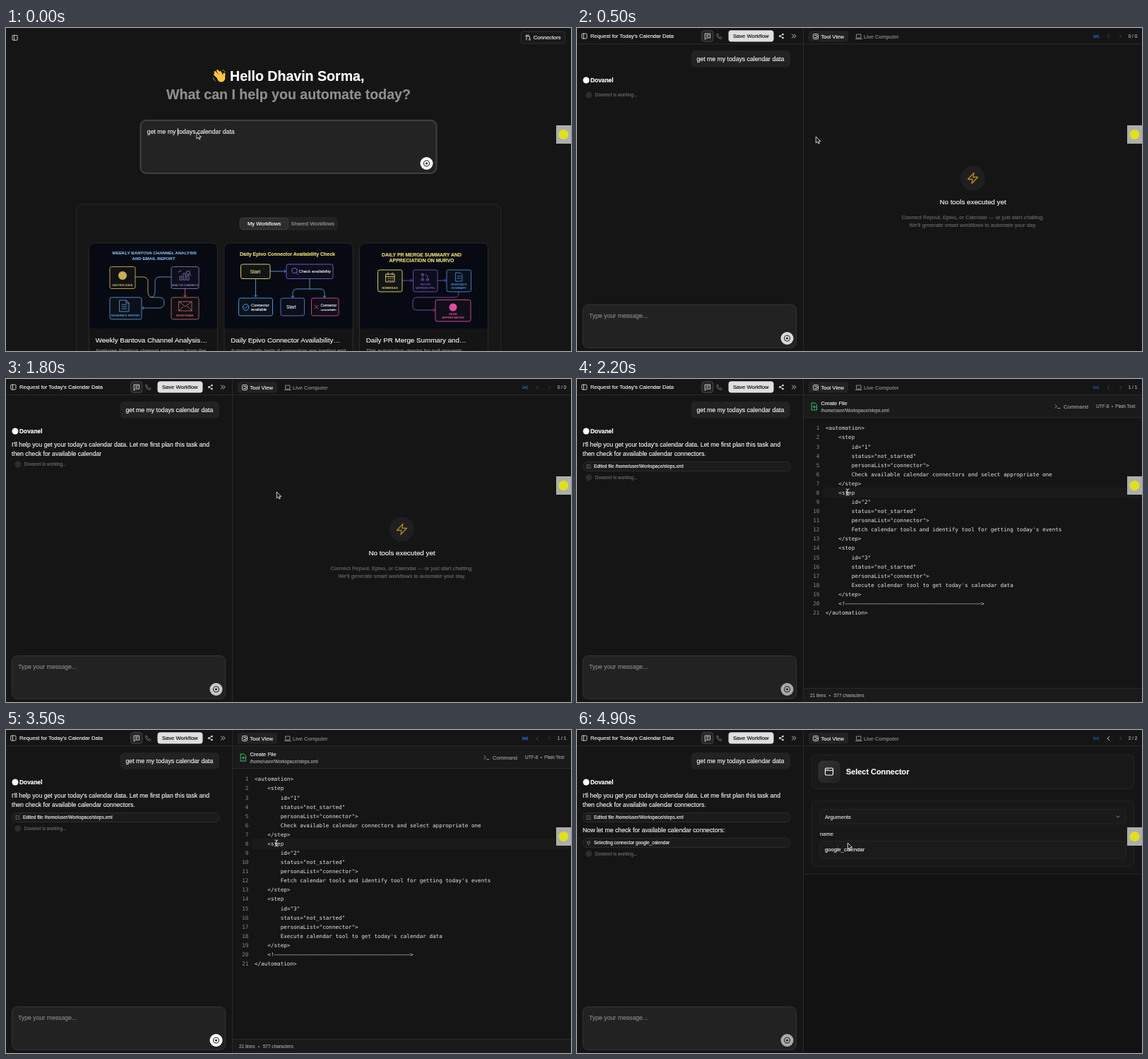
Write an HTML page that moves like this. It is 800 px wide and 458 px high and loops after 5 s.

```html
<!DOCTYPE html>
<html lang="en">
<head>
<meta charset="utf-8">
<title>Workflow assistant</title>
<style>
html, body { margin: 0; width: 100%; height: 100%; overflow: hidden; background: #151515; }
svg { display: block; width: 100vw; height: 100vh; font-family: "Liberation Sans", Arial, sans-serif; }
text { white-space: pre; stroke-width: .16px; }
.mono { font-family: "DejaVu Sans Mono", monospace; stroke: none; }
.icon { fill: none; stroke-linecap: round; stroke-linejoin: round; }
</style>
</head>
<body>
<svg id="stage" viewBox="0 0 800 458"></svg>
<script>
const LOOP = 5000, STEP = 100;
const OPEN_CHAT = 500, REPLY = 1200, FILE_READY = 2100, FOLLOW_UP = 3600, CONNECTOR = 4100;
// The interface is drawn at 800/1470 scale: 12, 14, 16, 18, 20 and 36 px type.
const XS = 6.53, SM = 7.62, MD = 8.71, LG = 9.8, XL = 10.88, HERO = 19.58;

const REPLY_LINES = [
  "I'll help you get your today's calendar data. Let me first plan this task and",
  "then check for available calendar connectors."
];
const FOLLOW_LINE = "Now let me check for available calendar connectors:";

const escapeText = s => s.replace(/&/g, "&amp;").replace(/</g, "&lt;");
const text = (x, y, size, s, fill = "#f2f2f2", extra = "") =>
  `<text x="${x}" y="${y}" font-size="${size}" fill="${fill}" stroke="${fill}" ${extra}>${escapeText(s)}</text>`;
const centered = (x, y, size, s, fill, extra = "") => text(x, y, size, s, fill, `text-anchor="middle" ${extra}`);
const box = (x1, y1, x2, y2, r, fill, stroke = "none", width = 1) =>
  `<rect x="${x1}" y="${y1}" width="${x2 - x1}" height="${y2 - y1}" rx="${r}" fill="${fill}" stroke="${stroke}" stroke-width="${width}"/>`;
const disc = (x, y, r, fill, extra = "") => `<circle cx="${x}" cy="${y}" r="${r}" fill="${fill}" ${extra}/>`;
const ring = (x, y, r, stroke, width = .9) => disc(x, y, r, "none", `stroke="${stroke}" stroke-width="${width}"`);
const icon = (d, stroke = "#ddd", width = .9) => `<path class="icon" d="${d}" stroke="${stroke}" stroke-width="${width}"/>`;
const group = (id, body) => `<g id="${id}">${body}</g>`;
const BOLD = 'font-weight="bold"';

const sidebarIcon = (x, y) => box(x, y, x + 7.2, y + 7, 1.2, "none", "#ddd", .9) + icon(`M${x + 2.6} ${y}v7`);
const sendButton = (x, y) => disc(x, y, 9, "#fff") + ring(x, y, 4, "#222", 1.1) + disc(x, y, 1.6, "#222");

// Workflow cards
const artBox = (x1, y1, x2, y2, color, labels = [], size = 4.2) => box(x1, y1, x2, y2, 2.5, color + "0c", color, .9) +
  labels.map((s, i) => centered((x1 + x2) / 2, y2 - 3.6 - (labels.length - 1 - i) * 5, size, s, color)).join("");
const artTitle = (x, y, size, s, color) => centered(x, y, size, s, color, BOLD);

function emailReportArt() {
  const gold = "#c9ad55", violet = "#7d74b8", blue = "#6094c8", red = "#bd6a5d";
  return artTitle(210, 320.7, 6.1, "WEEKLY BANTOVA CHANNEL ANALYSIS", "#79b4e6") +
    artTitle(209, 328.6, 6.1, "AND EMAIL REPORT", "#79b4e6") +
    icon("M183 353H194Q201 353 201 360V374Q201 382 208 382H210", gold) +
    icon("M234 353H218Q211 353 211 360V374Q211 382 204 382M211 382H217Q224 382 224 389Q224 397 217 397H193m2-2l-2 2l2 2", blue) +
    icon("M253.5 369V381m-2-2l2 2l2-2", red) +
    artBox(147, 338.5, 183, 369.5, gold, ["GATHER DATA"]) + disc(165, 351, 6, gold) +
    artBox(234, 338.5, 273, 369.5, violet, ["ANALYZE CHANNELS"], 3.7) +
    icon("M246 357v-5h3v5zM251 357v-9h3v9zM256 357v-6h3v6zM244 346l4-2M260 349l2 2", violet) + ring(258, 347, 2.6, violet) +
    artBox(147, 382, 192, 413, blue, ["GENERATE REPORT"]) +
    icon("M161 386h9l4 4v12h-13zM170 386v4h4M164 392h7M164 395h7M164 398h7", blue) +
    artBox(234, 382, 273, 413, red, ["SEND EMAIL"]) + icon("M245 388h18v13h-18zl9 7l9-7M245 401l6-6M263 401l-6-6", red);
}

function availabilityArt() {
  const yellow = "#e8da72", violet = "#785fce", blue = "#55a0e0", indigo = "#6174cf", pink = "#c84f97", pale = "#dde4f4";
  return artTitle(398.5, 322.7, 6.95, "Daily Epivo Connector Availability Check", yellow) +
    artBox(332.5, 335, 374, 355.5, yellow) + centered(353, 347.5, 6.8, "Start", yellow) +
    icon("M374 345H396m-2-2l2 2l-2 2", blue) + icon("M353.5 356V381m-2-2l2 2l2-2", blue) +
    artBox(397, 335, 463, 355.5, violet) + ring(408.5, 344, 3.7, violet, 1) + icon("M411 347l3 3", violet) +
    text(414.5, 347, 5.9, "Check availability", pale) +
    icon("M430 356V370M406 382V376Q406 370 412 370H445Q451 370 451 376V382m-2-2l2 2l2-2M404 380l2 2l2-2", blue) +
    artBox(329.5, 383, 377.5, 408, blue) + ring(339.5, 396, 4.3, blue, 1) + icon("M337.5 396l1.5 1.5l3-3", blue) +
    text(347, 394.7, 5.6, "Connector", pale) + text(347, 401.3, 5.6, "available", pale) +
    artBox(389, 383, 422.5, 408, indigo) + centered(404, 397.7, 6.3, "Start", pale) +
    artBox(432.5, 383, 471, 408, pink) + icon("M437 393l5 5m0-5l-5 5", pink) +
    text(445.5, 395.2, 4.9, "Connector", pale) + text(445.5, 401, 4.4, "unavailable", pale);
}

function mergeSummaryArt() {
  const yellow = "#e8d977", violet = "#7650ba", blue = "#4b87c8", pink = "#dd4f9e";
  return artTitle(588.5, 323.5, 6.95, "DAILY PR MERGE SUMMARY AND", yellow) +
    artTitle(588.5, 332.3, 6.95, "APPRECIATION ON MURVO", yellow) +
    icon("M561 358H575m-2-2l2 2l-2 2M611 358H623m-2-2l2 2l-2 2", violet) +
    icon("M641 374V376Q641 382 635 382H582Q576 382 576 388V394Q576 400 582 400H607m-2-2l2 2l-2 2", violet) +
    artBox(526.5, 343, 561, 374, yellow, ["SCHEDULE"]) +
    icon("M538 349h12v11h-12zM538 352.5h12M541 347v3M547 347v3M541 355h1m2 0h1m2 0h1M541 358h1m2 0h1m2 0h1", yellow) +
    artBox(576.5, 343, 611, 374, violet, ["FETCH", "MERGED PRs"]) +
    icon("M590 350v6M597 356v-3q0-3-3-3M588.5 348.5h3v2h-3zM588.5 356h3v2h-3zM595.5 356h3v2h-3z", violet) +
    artBox(624, 343, 658.5, 374, blue, ["GENERATE", "SUMMARY"]) + icon("M637 347h6l3 3v9h-9zM639 352h5M639 355h5", blue) +
    artBox(608, 385.5, 658, 416, pink, ["SEND", "APPRECIATION"]) + disc(633, 396, 5.5, pink);
}

const card = (x, art, title, about) => box(x, 305, x + 182, 480, 8, "#141414", "#2b2b2b") +
  `<path d="M${x + .5} 426V313q0-7.5 7.5-7.5h166q7.5 0 7.5 7.5V426z" fill="#070a12"/>` + art +
  text(x + 9.2, 445.5, LG, title) + text(x + 9.2, 460.3, SM, about, "#858585");

const wavingHand = icon("M301 71L295.5 66M302 69.5L296 62.5M304 68L299.5 60.5M306 68L303.5 62.5", "#ffc83d", 2.9) +
  icon("M308.5 71L309 65", "#ffc83d", 3) +
  `<ellipse cx="304.7" cy="71" rx="5.6" ry="5.6" fill="#ffc83d"/>` +
  icon("M300 68l-2-2M302.500 66.500l-2-2.500M305 72q0-3 3-4", "#d9962a", .6) +
  icon("M293.500 70.500q.5 3 3 4.500M306.500 59.500q3 .5 4 3", "#a98a55", 1);

const home = sidebarIcon(9, 10.3) +
  box(729, 5, 791.5, 22, 4, "#191919", "#303030") +
  icon("M737 12v5M741.5 15v-2q0-2-2-2h-1m1.3-1.4l-1.4 1.4l1.4 1.4") + ring(737, 11, 1.1, "#ddd", .8) + ring(741.5, 16.3, 1.1, "#ddd", .8) +
  text(746.7, 16.4, SM, "Connectors") +
  wavingHand + text(317, 75, HERO, "Hello Dhavin Sorma,", "#fff", BOLD) +
  centered(400, 101, HERO, "What can I help you automate today?", "#8f8f8f", BOLD) +
  box(190.5, 131, 609.5, 206, 8, "#232323", "#404040", 2) +
  text(199.8, 150.2, MD, "get me my todays calendar data") +
  group("caret", icon("M243.3 142.5v9.5", "#fff")) + sendButton(595.5, 192) +
  box(99.5, 250, 700.5, 480, 8, "#171717", "#272727") +
  box(330, 268, 470, 287, 5, "#222") + box(331.5, 269.5, 399.5, 285.5, 4, "#2d2d2d", "#3b3b3b") +
  text(342, 280, SM, "My Workflows", "#fff") + text(403.5, 280, SM, "Shared Workflows", "#999") +
  card(117.5, emailReportArt(), "Weekly Bantova Channel Analysis…", "Analyzes Bantova channel messages from the") +
  card(309, availabilityArt(), "Daily Epivo Connector Availability…", "Automatically tests if connectors are loading and") +
  card(500.5, mergeSummaryArt(), "Daily PR Merge Summary and…", "This automation checks for pull requests");

// Chat view
const chip = (y, label, glyph) => box(8.5, y - 6.5, 302, y + 6.5, 6, "#1b1b1b", "#2b2b2b") + glyph +
  text(24, y + 2.3, XS, label);

const chat = icon("M0 22.5H800M320.5 0V458", "#292929", 1) +
  sidebarIcon(6.8, 8) + text(19, 14.4, SM, "Request for Today's Calendar Data") +
  box(176.5, 3.5, 193, 19.5, 4, "#262626", "#424242") +
  icon("M181.5 8h7v6h-5l-2 2zM183.5 10h3M183.5 12h2") +
  icon("M198 8.5q1-1 2 .5l.5 1.5l-1 1q1 1.5 2.5 2l1-1l1.5.7q1 .8 0 1.8q-2 1.5-5-1.8t-1.5-4.7z", "#777") +
  box(214.5, 3.2, 278.5, 19.6, 4, "#dfdfe2") + text(221, 14.1, SM, "Save Workflow", "#111") +
  icon("M291 9.5l-4 2l4 2") + disc(287.2, 11.5, 1.3, "#ddd") + disc(291.5, 9, 1.3, "#ddd") + disc(291.5, 14, 1.3, "#ddd") +
  icon("M304.5 9l2.5 2.5l-2.5 2.5M307.5 9l2.5 2.5l-2.5 2.5") +
  box(161.5, 32, 302, 55.5, 6, "#222") + text(169.5, 46.8, MD, "get me my todays calendar data") +
  disc(13, 74, 4.5, "#fff") + text(19, 77.3, 8.4, "Dovanel", "#fff", BOLD) +
  ["reply0", "reply1", "follow"].map((id, i) => text(8, [95.8, 108.8, 145.2][i], MD, "", "#f2f2f2", `id="${id}"`)).join("") +
  group("fileChip", chip(124, "Edited file /home/user/Workspace/steps.xml",
    icon("M17 121.5h-3v5h5v-3M16 124.5l3-3.5", "#777", .7))) +
  group("connectorChip", chip(160, "Selecting connector google_calendar",
    icon("M15 157.5v1.5M18 157.5v1.5M14.5 159.2h4v1q0 1.5-2 1.5t-2-1.5zM16.5 162v1.5", "#777", .7))) +
  group("working", disc(16.8, 0, 4.5, "#2d2d2d") + text(25.5, 2.3, XS, "Dovanel is working...", "#686868")) +
  box(8.5, 392.5, 310.5, 453.5, 7, "#222", "#343434") + text(17, 411.4, MD, "Type your message...", "#858585") +
  group("send", sendButton(297.5, 440)) +
  box(327.5, 4, 384, 19.6, 4, "#222") + box(334.5, 8.5, 341.5, 15.5, 1, "none", "#ddd", .9) +
  icon("M336.5 10.5h3M336.5 13.5h3M339 12h2") + text(345.5, 14.5, SM, "Tool View") +
  icon("M396 9h6v5h-6zM394.5 15.5h9", "#999") + text(406, 14.5, SM, "Live Computer", "#8c8c8c") +
  group("radio", icon("M732.2 9.5q-2 2.5 0 5M733.7 10.7q-1 1.3 0 2.6M737.8 9.5q2 2.5 0 5M736.3 10.7q1 1.3 0 2.6", "#2f6be0", 1) +
    disc(735, 12, 1, "#2f6be0")) +
  `<path id="previous" class="icon" d="M753.5 9.5l-2.3 2.5l2.3 2.5"/>` + icon("M768.5 9.5l2.3 2.5l-2.3 2.5", "#444") +
  text(780.7, 14.3, XS, "", "#b0b0b0", 'id="counter"');

const emptyTools = disc(560.5, 213, 17.5, "#1f1f1f") +
  group("bolt", icon("M562 205.5L553.5 214.5H560L559 220.5L567.5 211.5H561Z", "#dba325", 1.3)) +
  centered(560.5, 250, LG, "No tools executed yet", "#f5f5f5") +
  centered(560.5, 271.2, SM, "Connect Repvul, Epivo, or Calendar — or just start chatting.", "#696969") +
  centered(560.5, 282.1, SM, "We'll generate smart workflows to automate your day.", "#696969");

const planStep = (id, task) => ["    <step", `        id="${id}"`, '        status="not_started"',
  '        personaList="connector">', "        " + task, "    </step>"];
const codeLines = ["<automation>",
  ...planStep(1, "Check available calendar connectors and select appropriate one"),
  ...planStep(2, "Fetch calendar tools and identify tool for getting today's events"),
  ...planStep(3, "Execute calendar tool to get today's calendar data"),
  `    <!${"–".repeat(42)}>`, "</automation>"];

const codeView = box(321, 23, 800, 54, 0, "#1a1a1a") + box(321, 439, 800, 458, 0, "#1a1a1a") +
  icon("M321 54.5H800M321 438.5H800", "#292929", 1) +
  icon("M332.5 34h4.5l2.5 2.5v7.5h-7zM336 37.5v4M334 39.5h4", "#2fc565", 1) +
  text(345.5, 37.3, SM, "Create File") + text(345.5, 46.5, XS, "/home/user/Workspace/steps.xml", "#aaa") +
  icon("M677 36.5l2.5 2.3l-2.5 2.3M680.5 41.5h3.5", "#999") + text(689, 41.5, SM, "Command", "#999") +
  text(735, 41.2, XS, "UTF-8", "#a0a0a0") + centered(758, 41.2, XS, "•", "#a0a0a0") + text(762.3, 41.2, XS, "Plain Text", "#a0a0a0") +
  box(349, 154.7, 800, 167.7, 0, "#1a1a1a", "#202020", .6) +
  codeLines.map((line, i) => {
    const y = 72.4 + i * 13.08;
    return text(343.3, y, SM, String(i + 1), "#8b8b8b", 'class="mono" text-anchor="end"') +
      text(352, y, SM, line, "#e6e6e6", 'class="mono"');
  }).join("") +
  text(330, 450.5, XS, "21 lines", "#a0a0a0") + centered(358, 450.5, XS, "•", "#a0a0a0") + text(363.7, 450.5, XS, "577 characters", "#a0a0a0");

const connectorView = box(321, 205, 800, 458, 0, "#121212") + icon("M321 204.5H800", "#222", 1) +
  box(332.5, 35, 788.5, 83.5, 6, "#191919", "#242424") +
  box(342, 44, 372, 74, 6, "url(#tile)", "#363636", .6) +
  box(351.5, 54, 362.5, 64, 1.5, "none", "#fff", 1.1) + icon("M351.5 57.3h11M353.7 55.7h.1M355.7 55.7h.1", "#fff", 1) +
  text(381, 62.8, XL, "Select Connector", "#fff", BOLD) +
  box(332.5, 101, 788.5, 193.5, 6, "#181818", "#242424") +
  box(344, 112.5, 777, 133, 4, "#1a1a1a", "#252525") + text(351, 125.6, SM, "Arguments", "#e0e0e0") +
  icon("M763.5 121.8l2.4 2.4l2.4-2.4", "#999") + text(344, 150, SM, "name", "#e0e0e0") +
  box(344, 157.5, 777, 182, 4, "#1b1b1b", "#252525") + text(351, 172.4, SM, "google_calendar", "#eee");

document.getElementById("stage").innerHTML =
  `<defs><linearGradient id="tile" x2="1" y2="1"><stop stop-color="#333"/><stop offset="1" stop-color="#202020"/></linearGradient></defs>` +
  box(0, 0, 800, 458, 0, "#151515") + group("home", home) +
  group("chat", chat + group("emptyTools", emptyTools) + group("codeView", codeView) + group("connectorView", connectorView)) +
  box(779, 138, 800, 164, 0, "#adadad") + disc(789.5, 151, 7, "#e0e020") +
  group("pointer", '<path d="M0 0V9L2.1 7.2L3.6 10L5 9.4L3.6 6.6H6.4Z" fill="#111" stroke="#fff" stroke-width=".8"/>') +
  group("beam", icon("M381 156q2 0 2 1.5q0-1.5 2-1.5M383 157.5v6M381 165q2 0 2-1.5q0 1.5 2 1.5M381.8 161h2.4", "#ddd", 1));

const el = Object.fromEntries([...document.querySelectorAll("[id]")].map(node => [node.id, node]));
const show = (id, visible) => { el[id].style.display = visible ? "" : "none"; };
const clamp = (v, lo, hi) => Math.min(hi, Math.max(lo, v));
const words = (s, n) => s.split(" ").slice(0, Math.max(0, n)).join(" ");

function pointerPosition(t) {
  const path = [[0, 270, 148], [400, 293.3, 148], [600, 383.3, 160], [LOOP, 383.3, 160]];
  const i = path.findIndex(([time]) => time > t);
  const [t0, x0, y0] = path[i - 1], [t1, x1, y1] = path[i];
  const k = (t - t0) / (t1 - t0);
  return [x0 + (x1 - x0) * k, y0 + (y1 - y0) * k];
}

// The glow stands still during two short pauses.
function pulse(t) {
  const running = t - clamp(t - 2400, 0, 200) - clamp(t - 4400, 0, 300);
  return .76 + .24 * Math.cos(2 * Math.PI * (running - 3300) / (2000 / 3));
}

function render(t) {
  const fileReady = t >= FILE_READY, connector = t >= CONNECTOR;
  show("home", t < OPEN_CHAT);
  show("chat", t >= OPEN_CHAT);
  show("caret", t < 200);
  show("emptyTools", !fileReady);
  show("codeView", fileReady && !connector);
  show("connectorView", connector);
  show("fileChip", fileReady);
  show("connectorChip", connector);
  show("beam", fileReady && !connector);
  show("pointer", !fileReady || connector);
  el.pointer.setAttribute("transform", `translate(${pointerPosition(t)})`);

  const replied = t < REPLY ? 0 : 2 + Math.floor((t - REPLY) * 3 / STEP);
  const firstLine = REPLY_LINES[0].split(" ").length;
  const followed = t < FOLLOW_UP ? 0 : 3 + Math.floor((t - FOLLOW_UP) * 3 / STEP);
  el.reply0.textContent = words(REPLY_LINES[0], replied);
  el.reply1.textContent = words(REPLY_LINES[1], replied - firstLine);
  el.follow.textContent = words(FOLLOW_LINE, followed);

  const workingY = connector ? 175.5 : followed ? 157.5 : fileReady ? 139.7 : replied > firstLine ? 121 : replied ? 108 : 95;
  el.working.setAttribute("transform", `translate(0 ${workingY})`);
  el.counter.textContent = connector ? "2 / 2" : fileReady ? "1 / 1" : "0 / 0";
  el.previous.setAttribute("stroke", connector ? "#ddd" : "#444");
  for (const id of ["send", "bolt", "radio"]) el[id].style.opacity = pulse(t);
}

function frame(now) {
  render(Math.floor(now % LOOP / STEP) * STEP);
  requestAnimationFrame(frame);
}
render(0);
requestAnimationFrame(frame);
</script>
</body>
</html>
```
